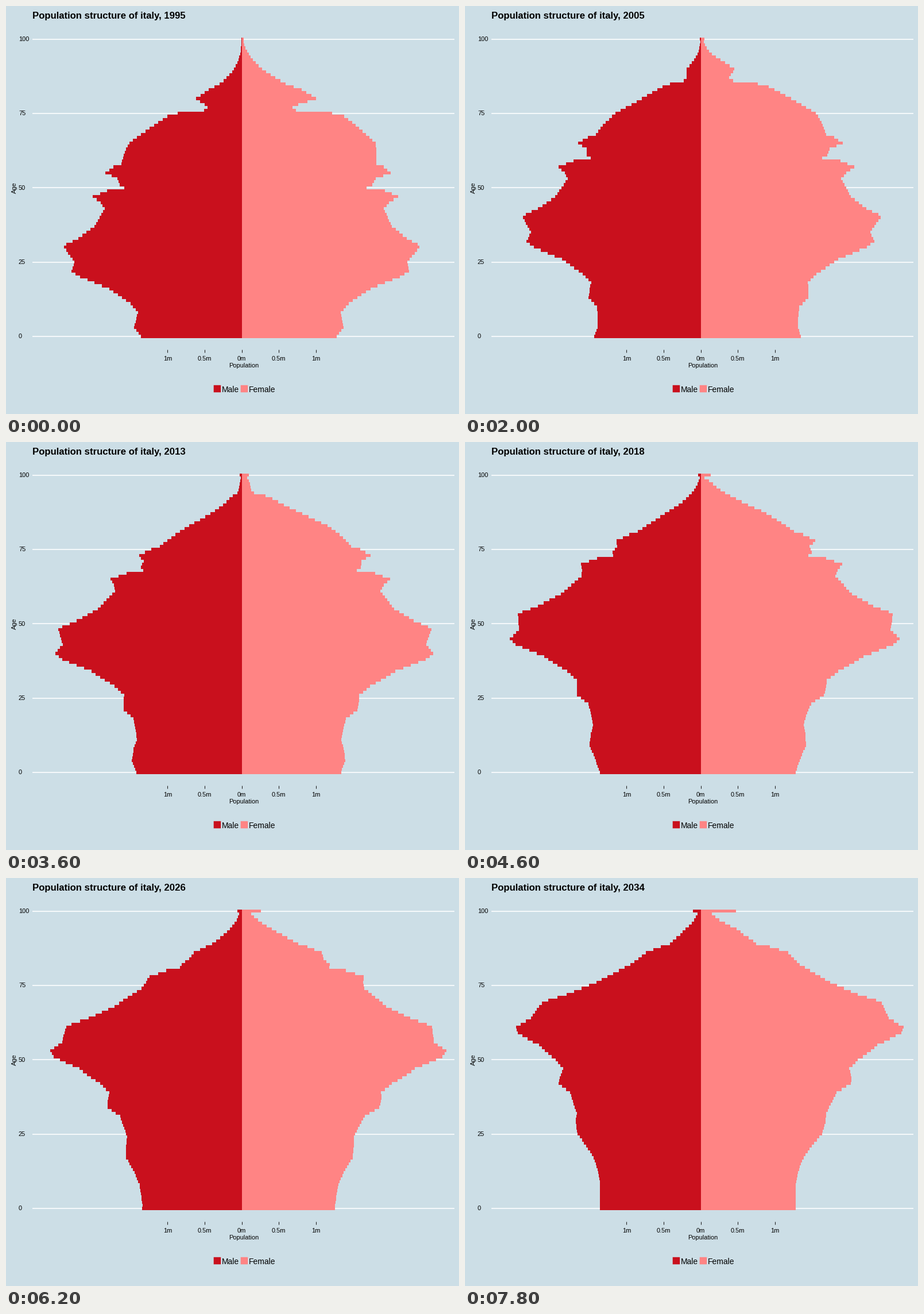
These frames come from a looping animation (789x710 px, 8000 ms). A matplotlib script:

```python
import numpy as np
import matplotlib.pyplot as plt
from matplotlib.animation import FuncAnimation
from matplotlib.patches import Rectangle

W, H, DPI = 789, 710, 100
FIRST, YEARS, STEP_MS = 1995, 40, 200
MID, MILLION = 410.6, 129.2          # x of the spine, length of 1m
Y0, ROW = 575, 5.175                 # y of age 0, height of one age
BG, MALE, FEMALE = "#ccdee6", "#c9101d", "#ff8484"
FONT = "Liberation Sans"
AGES = np.arange(101)

# Turning points of the yearly births: two wars, a boom, a decline
BIRTHS = {
    1900: 118, 1905: 125, 1910: 153, 1912: 179, 1915: 186, 1917: 130,
    1918: 112, 1919: 116, 1920: 188, 1921: 208, 1925: 221, 1930: 238,
    1937: 231, 1938: 244, 1940: 255, 1942: 229, 1944: 223, 1945: 213,
    1946: 244, 1948: 267, 1950: 252, 1952: 243, 1958: 259, 1962: 286,
    1964: 306, 1965: 310, 1970: 291, 1973: 296, 1975: 281, 1979: 230,
    1984: 193, 1987: 180, 1992: 187, 1995: 175, 2002: 178, 2005: 185,
    2009: 190, 2013: 183, 2018: 175, 2025: 172, 2034: 175}


def arrivals(age, year):
    """Yearly migration rate: first mostly the young, later adults."""
    peak, centre, spread = (.006, 14, 8) if year < 2004 else (.0105, 29, 13)
    return peak * np.exp(-((age - centre) / spread) ** 2 / 2)


def population(year, share, trend, risk, ageing, inflow, oldest, growth):
    """Bar lengths by age: births, less deaths, plus migration."""
    born = year - AGES
    births = np.interp(born, list(BIRTHS), list(BIRTHS.values()))
    births *= share * np.exp(trend * np.maximum(FIRST - born, 0))
    deaths = risk * np.exp(ageing * (AGES - 67) - .01 * (year - 1998))
    moved = sum((arrivals(y - born, y) * (y >= born)
                 for y in range(FIRST, year)), np.zeros(len(AGES)))
    size = births * np.exp(inflow * moved - deaths)
    size[100] = oldest * np.exp(growth * (year - FIRST))   # 100 and over
    return size


def men(year):
    return population(year, 1.005, 0, .2356, .097, 1, .9, .07)


def women(year):
    return population(year, .945, .0019, .107, .11, 1.35, 3, .0775)


fig = plt.figure(figsize=(W / DPI, H / DPI), dpi=DPI, facecolor=BG)
ax = fig.add_axes([0, 0, 1, 1])
ax.axis("off")


def px(size):
    return size * 72 / DPI


def label(x, y, text, size=11, **kw):
    kw = {"ha": "left", "va": "baseline", "color": "black", **kw}
    return ax.text(x, y, text, fontsize=px(size), family=FONT, **kw)


def line(x, y, color, width):
    ax.plot(x, y, color=color, lw=px(width), solid_capstyle="butt", zorder=1)


def bars(color):
    edges = Y0 + ROW / 2 - ROW * np.arange(len(AGES) + 1)
    return ax.stairs(np.full(len(AGES), MID), edges, baseline=MID, fill=True,
                     orientation="horizontal", color=color, lw=0,
                     antialiased=False, zorder=3)


for age in range(0, 101, 25):
    y = Y0 - age * ROW
    line([46, 781], [y, y], "white", 1.6)
    label(22, y + 3.3, str(age))

for value in (-1, -.5, 0, .5, 1):
    x = MID + value * MILLION
    line([x, x], [597.5, 602.5], "#222222", 1.1)
    label(x, 617, f"{abs(value):g}m", ha="center")

label(413.9, 629, "Population", ha="center")
label(14.8, 316, "Age", rotation=90, ha="center", va="center", zorder=5)
for x, color, text in ((361.7, MALE, "Male"), (408.7, FEMALE, "Female")):
    ax.add_patch(Rectangle((x, 659.8), 12.5, 12.5, fc=color, lw=0, snap=False))
    label(x + 14.3, 671.5, text, 13.9)
title = label(46, 22, "", 16.7, weight="bold")
left, right = bars(MALE), bars(FEMALE)
ax.set_xlim(0, W)
ax.set_ylim(H, 0)


def draw(i):
    year = FIRST + i
    left.set_data(values=MID - men(year))
    right.set_data(values=MID + women(year))
    title.set_text(f"Population structure of italy, {year}")
    return left, right, title


anim = FuncAnimation(fig, draw, frames=YEARS, interval=STEP_MS,
                     repeat=True, repeat_delay=0)
plt.show()
```
